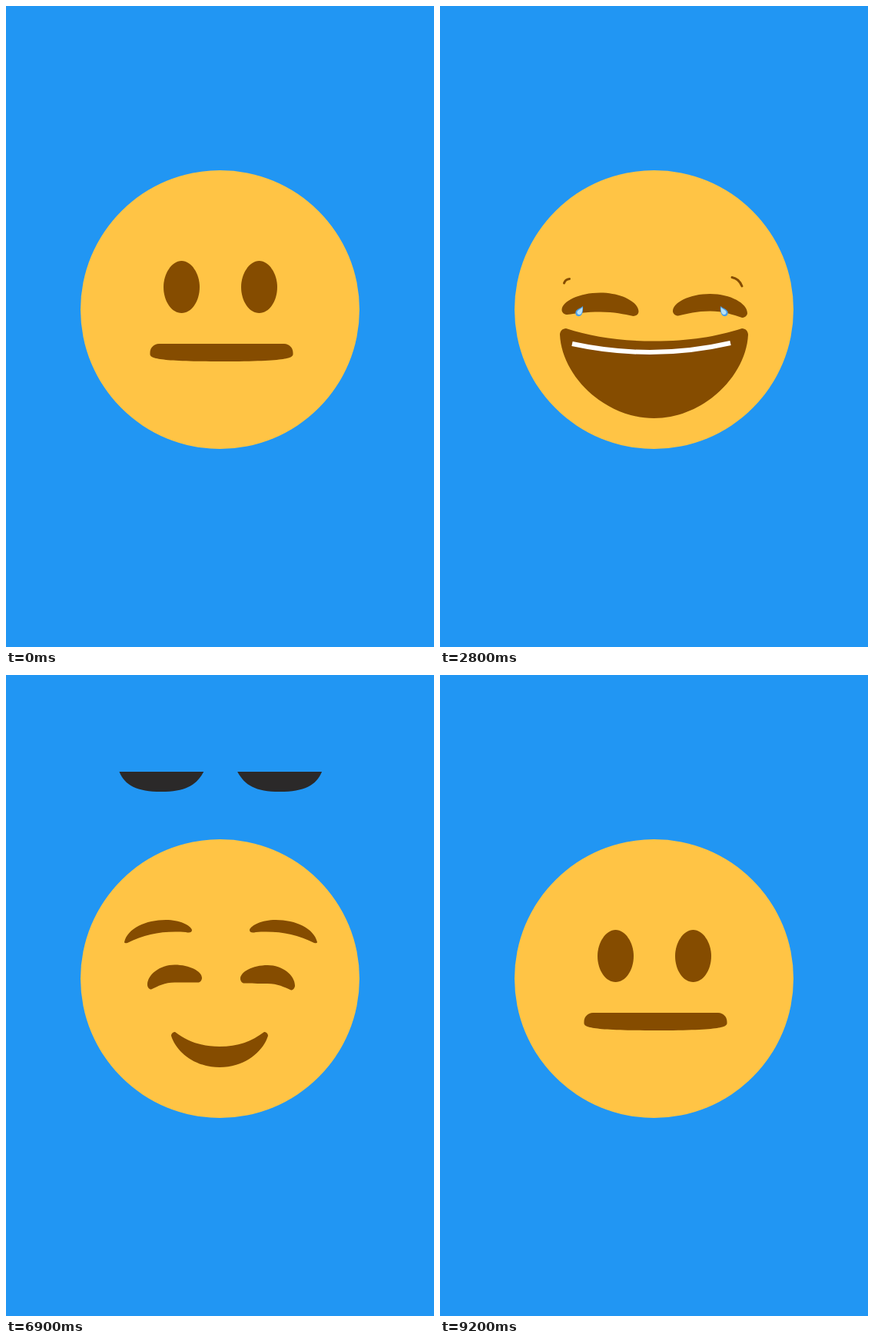
An HTML page for the animation above (9.3 s loop, 557x835 px).

```html
<!DOCTYPE html>
<html lang="en">
<head>
<meta charset="utf-8">
<title>Emoji moods</title>
<style>
html, body { margin: 0; width: 100%; height: 100%; overflow: hidden; background: #2196f3; }
svg { display: block; width: 100vw; height: 100vh; }
.line { fill: none; stroke: #854c00; stroke-width: 3; stroke-linecap: round; }
</style>
</head>
<body>
<svg viewBox="0 0 557 835" fill="#854c00">
  <defs>
    <clipPath id="stage"><rect y="126" width="557" height="709"/></clipPath>
    <path id="lens" d="M144 346Q148 336 154 334.500Q205 332 252 342L262 358L240 409H166Q144 390 144 346Z"/>
    <clipPath id="lenses">
      <use href="#lens"/><use href="#lens" transform="translate(558.500 0) scale(-1 1)"/>
    </clipPath>
    <path id="frameHalf" d="M279.500 337C250 337 250 319 127 327C121 329 119 345 131 350C138 356 141 368 144 382C149 408 164 420 202 420C240 420 252 408 262 384C267 370 270 356 279.500 356Z"/>
    <path id="brow" d="M154 348C158 330 182 319 208 319C226 319 240 326 242 332C242 336 238 336 234 335C205 333 182 337 158 349Q154 350 154 348Z"/>
    <g id="tear">
      <path fill="#4a9fe8" d="M186 391C190 440 186 518 133 518C95 518 88 480 95 460C105 430 150 420 186 391Z"/>
      <path fill="#b9e2f8" d="M180 409C182 445 174 500 141 498C117 496 107 472 114 460C124 440 156 430 180 409Z"/>
    </g>
  </defs>
  <rect width="557" height="835" fill="#2196f3"/>
  <circle cx="278.500" cy="395.500" r="181.500" fill="#ffc445"/>
  <path id="leftEye"/>
  <path id="rightEye"/>
  <g id="wideEye">
    <circle cx="362.500" cy="374.500" r="61" fill="#fff"/>
    <circle cx="362" cy="375.300" r="20"/>
  </g>
  <g id="brows">
    <use href="#brow"/><use href="#brow" transform="translate(559 0) scale(-1 1)"/>
  </g>
  <path id="leftCrease" class="line" d="M161.500 361Q163 356 168.500 355.500"/>
  <path id="rightCrease" class="line" d="M380 353.500Q389 355 393 365"/>
  <path id="mouth"/>
  <path id="teeth" fill="none" stroke="#fff" stroke-width="6" d="M172 440Q276 462.500 378 439"/>
  <path id="tongue" fill="#ff5455" d="M229 477.500L230.500 558C232 582 254 595 280 595C306 595 330 580 330 555V477.500Q280 480 229 477.500Z"/>
  <g id="leftTear"><use href="#tear"/></g>
  <g id="rightTear"><use href="#tear" transform="translate(551 0) scale(-1 1)"/></g>
  <g clip-path="url(#stage)">
    <g id="glasses" fill="#2b2929">
      <use href="#frameHalf"/><use href="#frameHalf" transform="translate(558.500 0) scale(-1 1)"/>
      <g clip-path="url(#lenses)"><path id="glint" fill="#6d6b6b"/></g>
    </g>
  </g>
</svg>
<script>
const LOOP = 9300, STEP = 100;
const el = id => document.getElementById(id);
const span = (t, a, b) => Math.max(0, Math.min(1, (t - a) / (b - a)));
const mix = (a, b, p) => a + (b - a) * p;
const easeInOut = p => p < .5 ? 2 * p * p : 1 - 2 * (1 - p) ** 2;
const ease = (t, a, b) => easeInOut(span(t, a, b));
const outBack = (p, s = 2.6) => 1 + (s + 1) * (p - 1) ** 3 + s * (p - 1) ** 2;

// x: centre, w: half width, tip: corner height, r: corner radius, k: fullness, lean: inward slope of the sides
const mouths = {
  flat:  { x: 280.5, w: 93, tip: 440, top: 440, bottom: 463, r: 11.5, k: 1.05, lean: 0 },
  smile: { x: 279, w: 109, tip: 427, top: 448, bottom: 522, r: 6, k: .5, lean: .05 },
  laugh: { x: 278.5, w: 122.5, tip: 420, top: 436.5, bottom: 537, r: 8, k: .52, lean: .02 },
  wink:  { x: 279, w: 112, tip: 460, top: 469, bottom: 538, r: 6, k: .54, lean: .12 },
  calm:  { x: 278, w: 63, tip: 465, top: 484, bottom: 511, r: 5, k: .52, lean: .1 },
  cool:  { x: 279, w: 86, tip: 449, top: 478, bottom: 502, r: 5, k: .5, lean: .15 }
};

// l, r: heights of the lower ends, notch: height of the underside, h, v: radii of the ends
const open = { x: 228.5, w: 23.5, top: 332, l: 400, r: 400, notch: 400, h: 23.5, v: 34 };
const happy = { x: 229, w: 30, top: 332, l: 398, r: 398, notch: 375, h: 6, v: 18 };
const leftEyes = {
  open, happy,
  squint: { x: 208.5, w: 50, top: 373.5, l: 402, r: 404, notch: 398.5, h: 7, v: 6 },
  calm: { x: 219.5, w: 35.5, top: 377.5, l: 409.5, r: 400.5, notch: 400.5, h: 5, v: 6 }
};
const rightEyes = {
  open: { ...open, x: 329.5 }, happy: { ...happy, x: 330 },
  squint: { x: 351.5, w: 48.5, top: 375, l: 403.5, r: 406, notch: 397.5, h: 7, v: 6 },
  calm: { x: 340.5, w: 35.5, top: 378, l: 401.5, r: 410.5, notch: 402, h: 5, v: 6 }
};

const mouthMoves = [[0, 500, 'smile'], [950, 1400, 'laugh'], [2850, 3400, 'wink'],
  [5050, 5500, 'calm'], [6950, 7450, 'cool'], [8650, 9150, 'flat']];
const eyeMoves = [[0, 500, 'happy'], [1750, 2300, 'squint'], [5050, 5500, 'calm'], [7500, 7501, 'open']];

function morph(shapes, first, moves, t) {
  const shape = { ...shapes[first] };
  for (const [a, b, name] of moves)
    for (const key in shape) shape[key] = mix(shape[key], shapes[name][key], ease(t, a, b));
  return shape;
}

// Closed outline from two sides, each running from the top centre to the bottom centre.
function outline(side) {
  const [first, ...rest] = [...side(1), ...side(-1).reverse().slice(1)];
  return `M${first}C${rest.join(' ')}Z`;
}

const mouthPath = ({ x, w, tip, top, bottom, r, k, lean }) => outline(s => [
  [0, top], [.38 * w, top], [.66 * w, mix(tip, top, .65)], [w - r, tip],
  [w - .45 * r, tip], [w, tip + .45 * r], [w, tip + r],
  [w * (1 - lean), mix(tip + r, bottom, .5)], [w * k, bottom], [0, bottom]
].map(([dx, y]) => [x + s * dx, y]));

const eyePath = ({ x, w, top, l, r, notch, h, v }) => outline(s => {
  const end = s > 0 ? r : l, inner = w - h;
  return [
    [0, top], [.55 * w, top], [w, mix(end - v, top, .5)], [w, end - v],
    [w, end - .45 * v], [w - .45 * h, end], [inner, end],
    [.72 * inner, mix(end, notch, .45)], [.42 * inner, notch], [0, notch]
  ].map(([dx, y]) => [x + s * dx, y]);
});

const place = (id, transform) => el(id).setAttribute('transform', transform);
function scaleAt(id, x, y, sx, sy = sx, dy = 0) {
  el(id).style.display = sx > .005 && sy > .005 ? '' : 'none';
  place(id, `translate(${x} ${y + dy}) scale(${sx} ${sy}) translate(${-x} ${-y})`);
}

function drawEyes(t) {
  const right = morph(rightEyes, 'open', eyeMoves, t);
  el('leftEye').setAttribute('d', eyePath(morph(leftEyes, 'open', eyeMoves, t)));
  el('rightEye').setAttribute('d', eyePath(right));
  scaleAt('rightEye', right.x, 390, 1 - ease(t, 2850, 3200) + ease(t, 5200, 5550));
  scaleAt('wideEye', 362.5, 374.5, ease(t, 2950, 3450) - ease(t, 5050, 5400));
}

function drawTears(t) {
  const size = ease(t, 1800, 2300) * (1 - span(t, 2400, 2990)) ** 2;
  const crease = Math.min(3, size / .104);
  scaleAt('leftTear', 186, 391, size);
  scaleAt('rightTear', 365, 391, size);
  scaleAt('leftCrease', 165, 358, crease);
  scaleAt('rightCrease', 387, 359, crease);
}

function drawGlasses(t) {
  const lift = 294 * (1 - ease(t, 6740, 7500) + ease(t, 8520, 9160));
  const x = mix(136, 540, ease(t, 7700, 8500));
  place('glasses', `translate(0 ${-lift})`);
  el('glint').setAttribute('d', `M${x + 10} 320h-60l-73 100h60Z`);
}

function draw(t) {
  const wiggle = Math.sin(2 * Math.PI * span(t, 5700, 6700)) ** 2;
  const brow = outBack(span(t, 5200, 5700)) * (1 - ease(t, 6950, 7300));
  drawEyes(t);
  drawTears(t);
  scaleAt('brows', 279.5, 340, brow, brow, -15 * wiggle);
  el('mouth').setAttribute('d', mouthPath(morph(mouths, 'flat', mouthMoves, t)));
  place('mouth', `translate(0 ${12 * wiggle})`);
  scaleAt('teeth', 275, 446, ease(t, 1300, 1700) - ease(t, 2850, 3150));
  scaleAt('tongue', 280, 478, 1, ease(t, 3250, 3700) - ease(t, 4850, 5200));
  drawGlasses(t);
}

const start = performance.now();
function tick() {
  const t = (performance.now() - start) % LOOP;
  draw(Math.floor(t / STEP) * STEP);
  requestAnimationFrame(tick);
}
tick();
</script>
</body>
</html>
```
